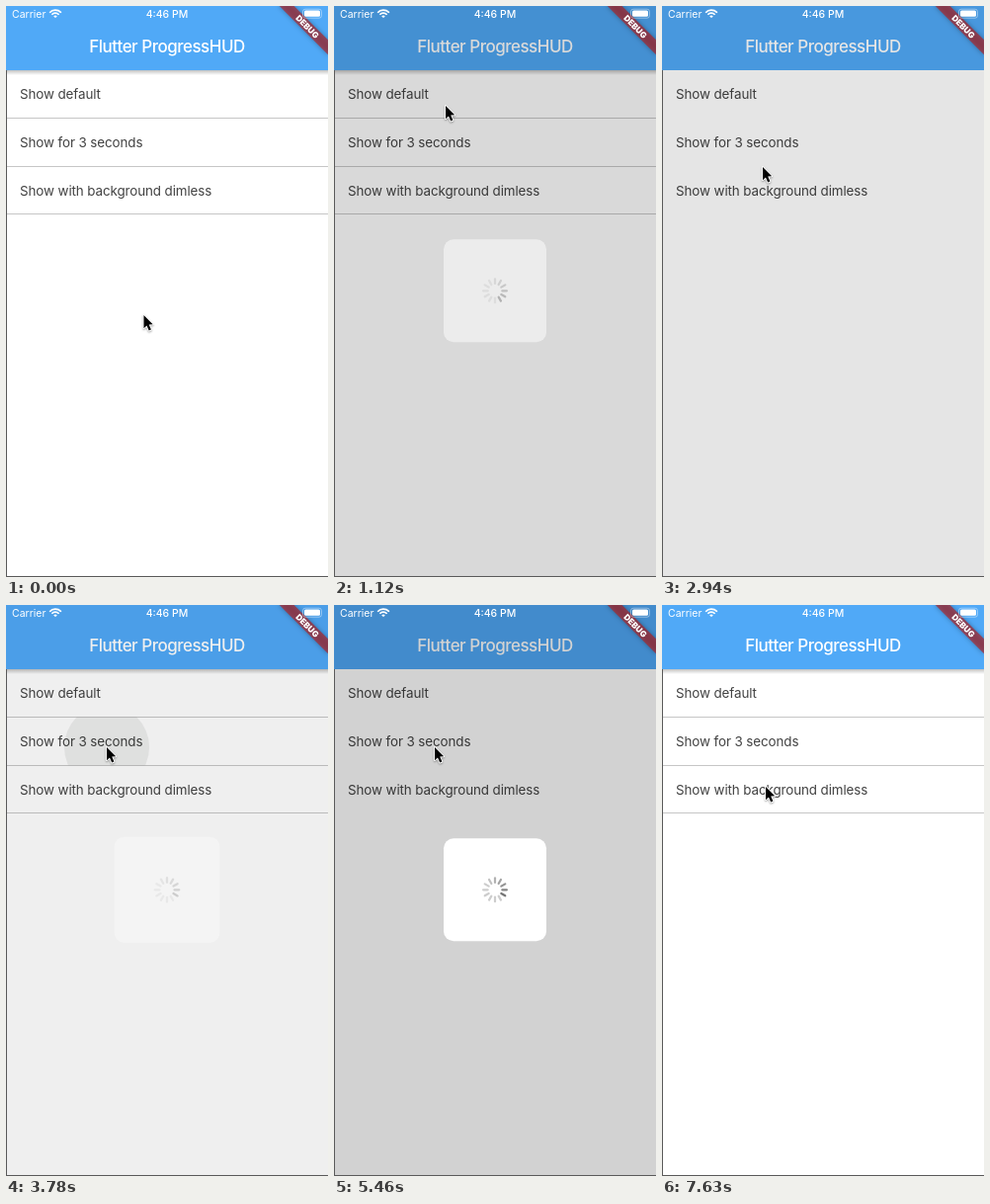
Animation of 326 by 578 pixels, one loop 8000 ms. Source, as an HTML page with a canvas:

```html
<!DOCTYPE html>
<html lang="en">
<head>
<meta charset="utf-8">
<title>Flutter ProgressHUD</title>
<style>
  html, body { margin: 0; width: 100%; height: 100%; overflow: hidden; background: #fff; }
  canvas { display: block; width: 326px; height: 578px; }
</style>
</head>
<body>
<canvas id="stage"></canvas>
<script>
const W = 326, H = 578, LOOP = 8000, STEP = 70;
const HEADER = 65, ROW = 48.6, SPIN = 853;
const canvas = document.getElementById('stage');
const ratio = window.devicePixelRatio || 1;
canvas.width = W * ratio;
canvas.height = H * ratio;
const ctx = canvas.getContext('2d');

// Each key is [time, ...values]; values are interpolated linearly.
const CURSOR = [[0, 139.5, 313], [70, 139.5, 313], [400, 122, 180], [700, 113, 101],
  [2520, 113, 101], [2870, 102, 163], [3010, 102, 163], [3290, 102, 144],
  [7280, 102, 144], [7630, 105, 184]];
const DIM = [[980, 0], [1120, .15], [1190, .176], [2840, .176], [3080, 0],
  [3710, 0], [3780, .063], [3920, .176], [6930, .176], [7140, 0]];
// opacity, scale
const HUD = [[980, 0, 1.04], [1120, .5, 1], [1260, 1, 1], [2800, 1, 1], [2930, 0, 1],
  [3710, 0, 1.04], [3780, .31, 1.03], [3960, 1, 1], [6900, 1, 1], [7000, 0, 1]];
// start, x, y, row
const TAPS = [[840, 113, 101, 0], [3640, 102, 144, 1]];

function sample(keys, t) {
  const next = keys.findIndex(key => key[0] > t);
  if (next === 0) return keys[0].slice(1);
  if (next < 0) return keys[keys.length - 1].slice(1);
  const a = keys[next - 1], b = keys[next];
  const k = (t - a[0]) / (b[0] - a[0]);
  return a.slice(1).map((v, i) => v + (b[i + 1] - v) * k);
}

function rect(color, x, y, w, h) {
  ctx.fillStyle = color;
  ctx.fillRect(x, y, w, h);
}

function roundRect(color, x, y, w, h, r) {
  ctx.fillStyle = color;
  ctx.beginPath();
  ctx.roundRect(x, y, w, h, r);
  ctx.fill();
}

function text(str, x, y, size, color, { weight = 400, align = 'left', spacing = 0 } = {}) {
  ctx.font = `${weight} ${size}px Inter, sans-serif`;
  ctx.letterSpacing = spacing + 'px';
  ctx.textAlign = align;
  ctx.fillStyle = color;
  ctx.fillText(str, x, y);
}

function drawPage(showLines) {
  rect('#fff', 0, 0, W, H);
  if (showLines) {
    const shadow = ctx.createLinearGradient(0, HEADER, 0, HEADER + 5);
    shadow.addColorStop(0, 'rgba(0,0,0,.24)');
    shadow.addColorStop(1, 'rgba(0,0,0,0)');
    rect(shadow, 0, HEADER, W, 5);
  }
  rect('#50a9f7', 0, 0, W, HEADER);
  text('Flutter ProgressHUD', W / 2, 47, 17, '#fff', { weight: 500, align: 'center', spacing: -.5 });
  ['Show default', 'Show for 3 seconds', 'Show with background dimless'].forEach((label, i) => {
    text(label, 14, 94.4 + i * ROW, 13.4, '#424242', { spacing: -.1 });
    if (showLines) rect('#c6c6c6', 0, Math.round(113 + i * ROW), W, 1);
  });
}

function drawRipple(t, [start, x, y, row]) {
  const age = t - start;
  if (age < 0 || age > 280) return;
  ctx.save();
  ctx.beginPath();
  ctx.rect(0, HEADER + row * ROW, W, ROW);
  ctx.clip();
  ctx.globalAlpha = .065 * Math.min(1, (280 - age) / 140);
  ctx.fillStyle = '#001008';
  ctx.beginPath();
  ctx.arc(x, y, 20 + age * .165, 0, 2 * Math.PI);
  ctx.fill();
  ctx.restore();
}

function drawSpinner(t) {
  const offset = t < 3500 ? 13.7 : 11.23;
  const head = Math.floor(offset + 12 * t / SPIN) % 12;
  for (let i = 0; i < 12; i++) {
    const behind = (head - i + 12) % 12;
    const grey = Math.min(205, 118 + behind * 15);
    ctx.save();
    ctx.rotate(i * Math.PI / 6);
    roundRect(`rgb(${grey},${grey},${grey})`, -1.1, -13, 2.2, 6.8, 1.1);
    ctx.restore();
  }
}

function drawHud(t) {
  const [opacity, scale] = sample(HUD, t);
  if (!opacity) return;
  ctx.save();
  ctx.globalAlpha = opacity;
  ctx.translate(163, 288.3);
  ctx.scale(scale, scale);
  roundRect('#fff', -52, -52, 104, 104, 10);
  drawSpinner(t);
  ctx.restore();
}

function drawBanner() {
  ctx.save();
  ctx.translate(W, 0);
  ctx.rotate(Math.PI / 4);
  ctx.shadowColor = 'rgba(0,0,0,.5)';
  ctx.shadowBlur = 5 * ratio;
  rect('rgba(183,28,28,.627)', -34.8, 24.3, 69.6, 10.5);
  ctx.shadowColor = 'transparent';
  text('DEBUG', 0, 32.6, 8.4, '#fff', { weight: 900, align: 'center' });
  ctx.restore();
}

function drawStatusBar() {
  text('Carrier', 6, 12, 10.5, '#fff');
  text('4:46 PM', 163, 12, 10.5, '#fff', { weight: 500, align: 'center' });
  ctx.strokeStyle = '#fff';
  ctx.lineWidth = 1.7;
  for (const radius of [1.6, 5, 8]) {
    ctx.beginPath();
    ctx.arc(50, 12.2, radius, -Math.PI * .76, -Math.PI * .24);
    ctx.stroke();
  }
  ctx.lineWidth = .8;
  ctx.strokeStyle = 'rgba(255,255,255,.5)';
  ctx.beginPath();
  ctx.roundRect(300.5, 3.2, 19, 9, 2.5);
  ctx.stroke();
  roundRect('#fff', 302, 4.6, 16, 6.2, 1.5);
}

function drawCursor(x, y) {
  ctx.save();
  ctx.translate(x, y);
  ctx.beginPath();
  [[0, 0], [0, 13.2], [3, 10.5], [5.2, 15.6], [7.4, 14.6], [5.2, 9.6], [9.2, 9.3]]
    .forEach(point => ctx.lineTo(...point));
  ctx.closePath();
  ctx.shadowColor = 'rgba(0,0,0,.35)';
  ctx.shadowBlur = 2 * ratio;
  ctx.shadowOffsetY = ratio;
  ctx.strokeStyle = '#fff';
  ctx.lineWidth = 1.8;
  ctx.lineJoin = 'round';
  ctx.stroke();
  ctx.shadowColor = 'transparent';
  ctx.fillStyle = '#000';
  ctx.fill();
  ctx.restore();
}

function draw(t) {
  ctx.setTransform(ratio, 0, 0, ratio, 0, 0);
  const [dim] = sample(DIM, t);
  const linesHidden = dim > .16 || (t > 2800 && t < 3080) || (t > 6900 && t < 7140);
  drawPage(!linesHidden);
  TAPS.forEach(tap => drawRipple(t, tap));
  rect(`rgba(0,2,0,${dim})`, 0, 0, W, H);
  drawHud(t);
  drawBanner();
  drawStatusBar();
  rect('#5a5a5a', 0, HEADER, 1, H - HEADER);
  rect('#5a5a5a', 0, H - 1, W, 1);
  drawCursor(...sample(CURSOR, t));
}

function frame(now) {
  draw(Math.floor((now % LOOP) / STEP) * STEP);
  requestAnimationFrame(frame);
}
draw(0);
requestAnimationFrame(frame);
</script>
</body>
</html>
```
